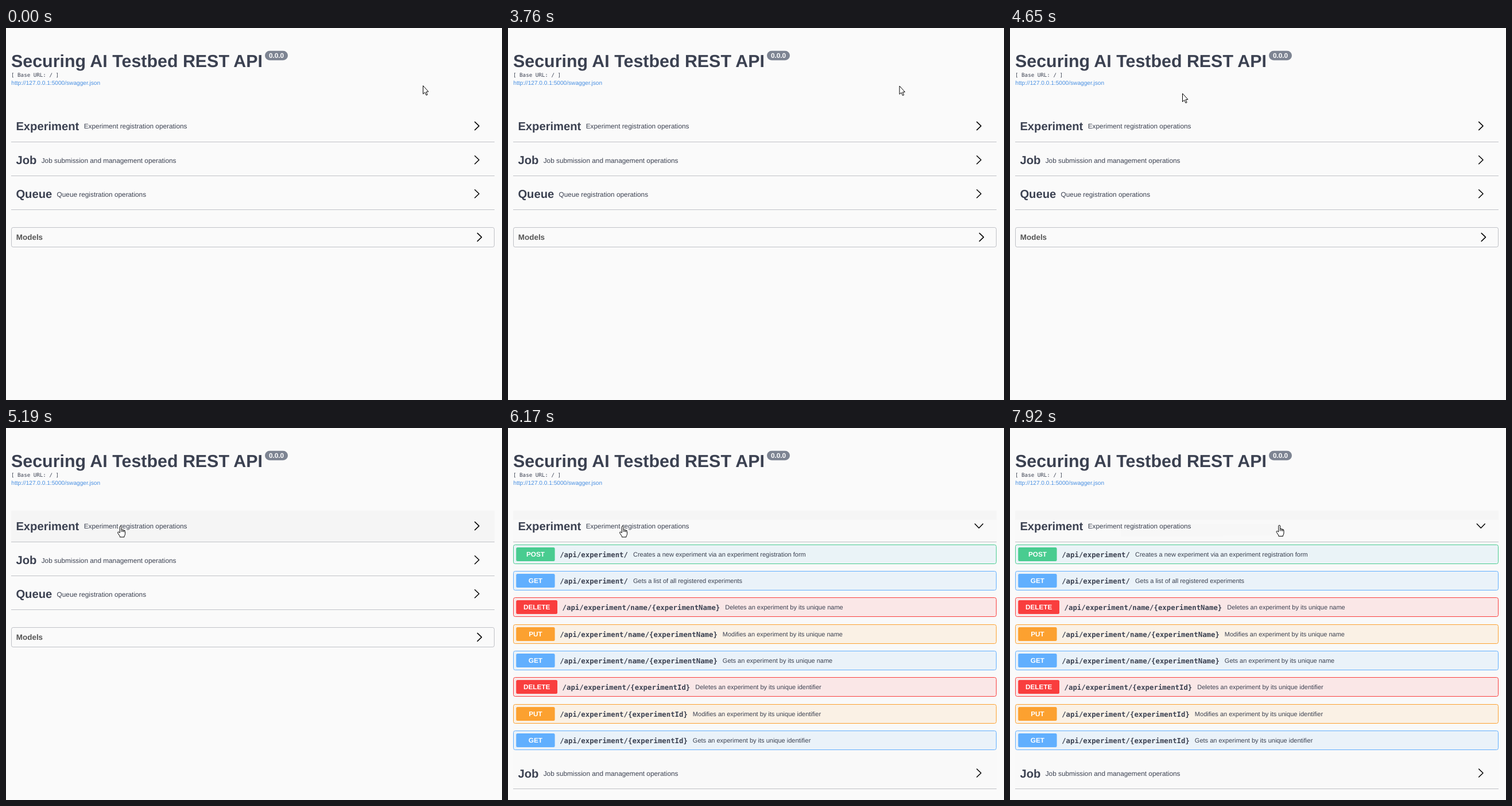
Write an HTML page with a canvas that moves like this. It is 864 by 648 pixels and loops after 8000 ms.

```html
<!DOCTYPE html>
<html lang="en">
<head>
<meta charset="utf-8">
<title>REST API page</title>
<style>
  html, body { margin: 0; width: 100%; height: 100%; overflow: hidden; background: #fafafa; }
  canvas { display: block; }
</style>
</head>
<body>
<canvas id="stage" width="864" height="648"></canvas>
<script>
const ctx = document.getElementById('stage').getContext('2d');
const SANS = '"Liberation Sans", Arial, sans-serif';
const MONO = '"DejaVu Sans Mono", monospace';
const INK = '#3b4151', RULE = 'rgba(59,65,81,.3)';
const LOOP = 8000, PRESS = 6060, OPEN = 6170;
const LEFT = 9, RIGHT = 851;

const METHODS = {
  POST: ['#49cc90', '#eaf3f7'],
  GET: ['#61affe', '#eaf2f9'],
  DELETE: ['#f93e3e', '#fae7e7'],
  PUT: ['#fca130', '#faf1e5']
};
const BASE = '/api/experiment/';
const BY_NAME = BASE + 'name/{experimentName}', BY_ID = BASE + '{experimentId}';
const OPERATIONS = [
  ['POST', BASE, 'Creates a new experiment via an experiment registration form'],
  ['GET', BASE, 'Gets a list of all registered experiments'],
  ['DELETE', BY_NAME, 'Deletes an experiment by its unique name'],
  ['PUT', BY_NAME, 'Modifies an experiment by its unique name'],
  ['GET', BY_NAME, 'Gets an experiment by its unique name'],
  ['DELETE', BY_ID, 'Deletes an experiment by its unique identifier'],
  ['PUT', BY_ID, 'Modifies an experiment by its unique identifier'],
  ['GET', BY_ID, 'Gets an experiment by its unique identifier']
];

// Pointer moves: start time, time per step, pointer tip at each step
const MOVES = [
  [0, 170, [[726.5, 100.5], [727.5, 99.5]]],
  [3760, 110, [[682, 101], [632, 101], [575, 102], [515, 103], [455, 104],
               [400, 106], [355, 108], [321.5, 110.5]]],
  [4650, 108, [[300.5, 114], [277, 127], [252, 141], [231, 154], [212, 165], [200, 171.5]]],
  [6820, 110, [[215, 171.5], [245, 171], [287, 170], [335, 169], [381, 168],
               [421, 168], [451, 169], [467, 170]]],
  [7920, 80, [[469.5, 170]]]
];

function pointerAt(time) {
  const [start, step, points] = MOVES.filter(move => move[0] <= time).pop();
  return points[Math.min(Math.floor((time - start) / step), points.length - 1)];
}

// Draws text and returns its width
function text(str, x, y, size, { color = INK, weight = 'normal', family = SANS, align = 'left' } = {}) {
  ctx.font = `${weight} ${size}px ${family}`;
  ctx.fillStyle = color;
  ctx.textAlign = align;
  ctx.fillText(str, x, y);
  return ctx.measureText(str).width;
}

function rect(x, y, w, h, color) {
  ctx.fillStyle = color;
  ctx.fillRect(x, y, w, h);
}

function roundRect(x, y, w, h, r, fill, stroke) {
  ctx.beginPath();
  ctx.roundRect(x, y, w, h, r);
  if (fill) { ctx.fillStyle = fill; ctx.fill(); }
  if (stroke) { ctx.strokeStyle = stroke; ctx.lineWidth = 1; ctx.stroke(); }
}

function chevron(x, y, down) {
  ctx.save();
  ctx.translate(x, y);
  if (down) ctx.rotate(Math.PI / 2);
  ctx.beginPath();
  ctx.moveTo(-3.6, -7);
  ctx.lineTo(3.7, 0);
  ctx.lineTo(-3.6, 7);
  ctx.strokeStyle = '#000';
  ctx.lineWidth = 1.5;
  ctx.lineCap = ctx.lineJoin = 'round';
  ctx.stroke();
  ctx.restore();
}

function header() {
  text('Securing AI Testbed REST API', LEFT, 67.5, 30.4, { weight: 'bold' });
  roundRect(451, 39.8, 40, 16.4, 8.2, '#7d8492');
  text('0.0.0', 471, 52.2, 11.8, { color: '#fff', weight: 'bold', align: 'center' });
  text('[ Base URL: / ]', LEFT, 84.5, 9.2, { family: MONO });
  text('http://127.0.0.1:5000/swagger.json', LEFT + .3, 98.8, 10.15, { color: '#4990e2' });
}

function section(name, about, y, open) {
  const width = text(name, 17.4, y + 7.1, 20.2, { weight: 'bold' });
  text(about, 17.4 + width + 8.4, y + 4.4, 11.8);
  chevron(820.3, y - .4, open);
  rect(LEFT, Math.floor(y + 27.3), RIGHT - LEFT, 1, RULE);
}

function operation([method, path, about], index) {
  const [color, tint] = METHODS[method];
  const y = Math.floor(204 + 46.35 * index);
  const labelWidth = method === 'DELETE' ? 71.8 : 67.4;
  roundRect(LEFT + .5, y - .5, RIGHT - LEFT - 1, 33, 3, tint, color);
  roundRect(14.2, y + 4, labelWidth, 24, 2.5, color);
  text(method, 14.2 + labelWidth / 2, y + 20.3, 11.76, { color: '#fff', weight: 'bold', align: 'center' });
  const x = 14 + labelWidth + 8.8;
  const width = text(path, x, y + 21.2, 12.33, { weight: 'bold', family: MONO });
  text(about, x + width + 9, y + 20.4, 11);
}

function models() {
  roundRect(LEFT + .5, 347.5, RIGHT - LEFT - 1, 34, 3, null, RULE);
  text('Models', 17.8, 368.8, 13.44, { color: '#555', weight: 'bold' });
  chevron(824.8, 364.4);
}

function outlined(path) {
  ctx.fillStyle = '#fff';
  ctx.strokeStyle = '#000';
  ctx.lineWidth = 1;
  ctx.lineJoin = 'round';
  ctx.fill(path);
  ctx.stroke(path);
}

const ARROW = new Path2D('M0 0V14.4L3.2 11.5L5.5 16.6L7.6 15.7L5.4 10.8L9.4 10.4Z');
const HAND = new Path2D('M-1.7 11V.8Q-1.7-.6-.3-.6Q1.2-.6 1.2.8V5.8Q2.6 4.6 3.6 6.3' +
  'Q5 5.2 5.4 6.9Q7.5 6 7.5 9V13Q7.5 15 6 17V18.5H-1.6V17L-5.3 11.4Q-5.8 9.6-4.2 9.4Z');
const KNUCKLES = new Path2D('M1.2 5.8V9.5M3.5 6.4V9.5M5.5 7V9.8');

function pointer(x, y, hand) {
  ctx.save();
  ctx.translate(x, y);
  outlined(hand ? HAND : ARROW);
  if (hand) ctx.stroke(KNUCKLES);
  ctx.restore();
}

function clickSpot() {
  ctx.save();
  ctx.globalCompositeOperation = 'multiply';
  ctx.fillStyle = '#fff45c';
  ctx.beginPath();
  ctx.arc(198.5, 170.8, 10, 0, Math.PI * 2);
  ctx.fill();
  ctx.restore();
}

function draw(time) {
  const [x, y] = pointerAt(time);
  const hand = y > 144, open = time >= OPEN;
  rect(0, 0, 864, 648, '#fafafa');
  header();
  if (hand) rect(LEFT, 144, RIGHT - LEFT, 54, '#f5f5f5');
  if (open) {
    rect(LEFT, 160, RIGHT - LEFT, 470, '#f9f9f9');
    if (x > 200) {
      rect(193, 167, Math.min(x, 372) - 193, 22, '#f7f7f7');
      if (x > 372) rect(372, 167, x - 372, 20, '#f7f7f7');
    }
  }
  section('Experiment', 'Experiment registration operations', 171, open);
  if (open) OPERATIONS.forEach(operation);
  section('Job', 'Job submission and management operations', open ? 601.4 : 230.1);
  if (!open) {
    section('Queue', 'Queue registration operations', 289.2);
    models();
  }
  pointer(x, y, hand);
  if (time >= PRESS && !open) clickSpot();
}

ctx.textRendering = 'geometricPrecision';
const began = performance.now();
function tick() {
  draw((performance.now() - began) % LOOP);
  requestAnimationFrame(tick);
}
tick();
</script>
</body>
</html>
```
